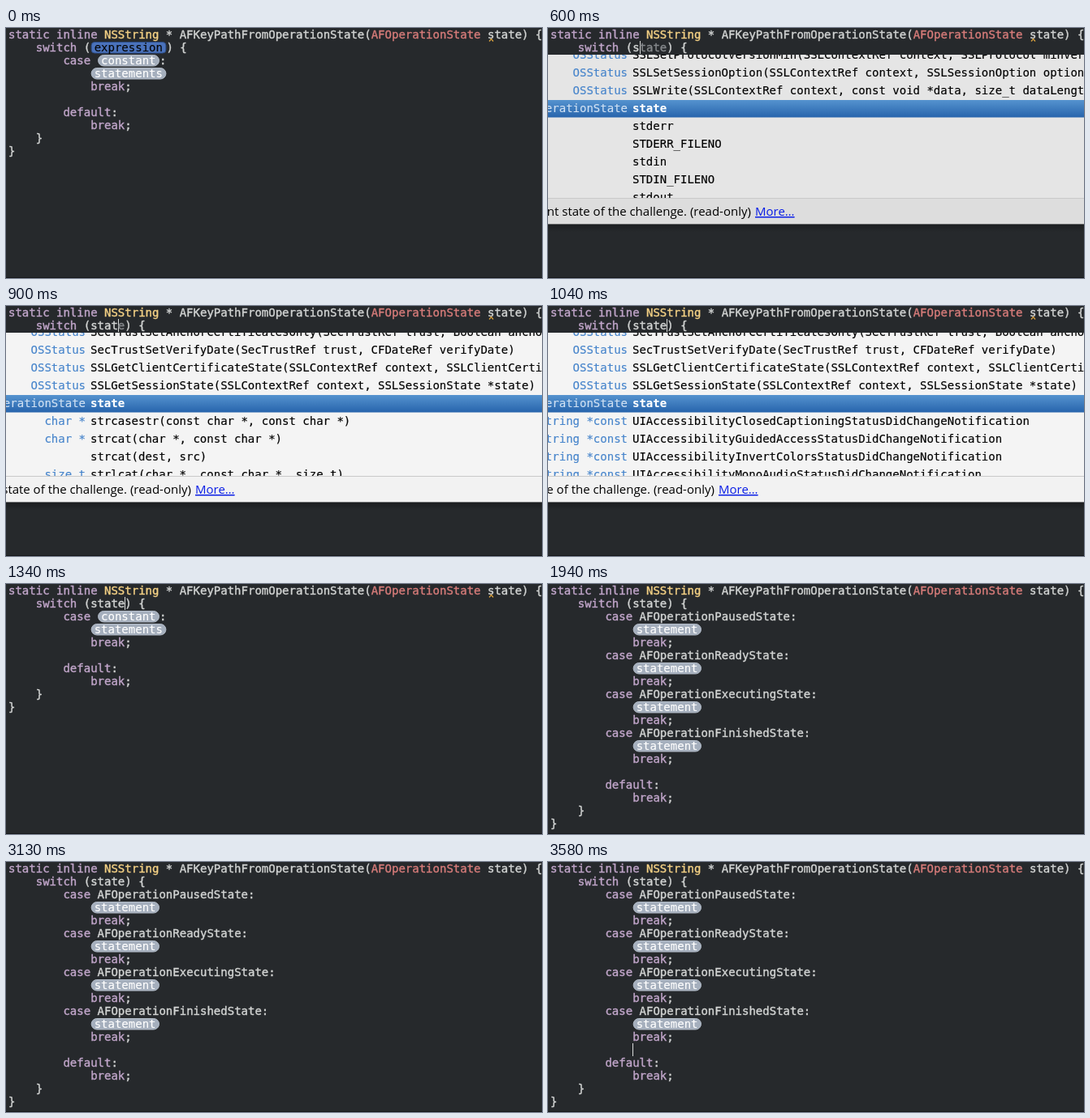
Write an HTML page that moves like this. It is 660 px wide and 309 px high and loops after 4130 ms.

```html
<!DOCTYPE html>
<html lang="en">
<head>
<meta charset="utf-8">
<title>Code completion</title>
<style>
  html, body { margin: 0; width: 100%; height: 100%; overflow: hidden; background: #26292c; }
  svg { display: block; width: 660px; height: 309px; }
  text {
    white-space: pre; font: 14px "DejaVu Sans Mono", monospace;
    color: #d2d4d3; fill: currentColor; stroke: currentColor; stroke-width: .4;
  }
  .key { color: #c0a5c9; }
  .type { color: #f3d084; }
  .arg { color: #d57b79; }
  .ghost { color: #85888b; }
  .token { color: #fff; stroke-width: .15; }
  .picked { color: #050607; stroke-width: .15; }
  .name { color: #000; stroke-width: .15; }
  .kind { color: #4684cb; stroke-width: .15; text-anchor: end; }
  .kind.on { color: #cfe0f3; }
  .name.on { color: #fff; font-weight: bold; }
  .note { color: #000; stroke-width: 0; font: 15px "Open Sans", "Noto Sans", sans-serif; }
  .end { text-anchor: end; }
  .link { color: #0a1ee6; text-decoration: underline; }
</style>
</head>
<body>
<svg id="stage" viewBox="0 0 660 309">
  <defs>
    <linearGradient id="bar" x2="0" y2="1">
      <stop stop-color="#5593cf"/><stop offset="1" stop-color="#2764ac"/>
    </linearGradient>
    <linearGradient id="shade" x2="0" y2="1">
      <stop stop-opacity=".3"/><stop offset="1" stop-opacity="0"/>
    </linearGradient>
    <clipPath id="rows"><rect y="33" width="660" height="177"/></clipPath>
  </defs>
</svg>
<script>
const LOOP = 4130, CHAR = 8.428, LEFT = 3, LINE = 16, ROW = 22;
const stage = document.getElementById('stage');

function add(parent, tag, attrs, text) {
  const el = document.createElementNS('http://www.w3.org/2000/svg', tag);
  for (const k in attrs) el.setAttribute(k, attrs[k]);
  if (text) el.textContent = text;
  return parent.appendChild(el);
}
const rect = (g, x, y, width, height, fill, more) =>
  add(g, 'rect', { x, y, width, height, fill, ...more });
const label = (g, x, y, cls, text) => add(g, 'text', { x, y, class: cls }, text);

const styles = [
  [/^(static|inline|switch|case|default|break)$/, 'key'],
  [/^NSString$/, 'type'],
  [/^AFOperationState$/, 'arg'],
  [/^~/, 'ghost']
];

// <word> is a placeholder, <!word> a selected one, ~word a suggested ending, | the caret.
function codeLine(g, row, source) {
  const top = row * LINE, base = top + 13;
  let x = LEFT;
  for (const part of source.match(/<[^>]+>|~?\w+|\||\s+|[^\w\s]/g)) {
    if (part === '|') {
      rect(g, Math.round(x), top, 1, LINE, '#d8dad9');
    } else if (part[0] === '<') {
      const picked = part[1] === '!';
      const word = part.replace(/[<>!]/g, '');
      const w = word.length * CHAR + 9;
      rect(g, x + 1, top + 1.5, w - 1.5, 13.5, picked ? '#4a72bb' : '#a5afbd',
        { rx: picked ? 4 : 6.75, stroke: picked ? '#2d4d86' : '#b4bdc9' });
      label(g, x + 4.5, base - 0.5, picked ? 'picked' : 'token', word);
      x += w;
    } else {
      const word = part.replace('~', '');
      const style = styles.find(s => s[0].test(part));
      if (word.trim()) label(g, x, base, style ? style[1] : '', word);
      x += word.length * CHAR;
    }
  }
}

const head = 'static inline NSString * AFKeyPathFromOperationState(AFOperationState state) {';
const tail = ['        default:', '            break;', '    }', '}'];
const stub = ['        case <constant>:', '            <statements>', '            break;', '', ...tail];
const cases = ['Paused', 'Ready', 'Executing', 'Finished'].flatMap(s =>
  [`        case AFOperation${s}State:`, '            <statement>', '            break;']);

function scene(subject, lines, warned = true) {
  const g = add(stage, 'g', { visibility: 'hidden' });
  [head, `    switch (${subject}) {`, ...lines].forEach((s, i) => s && codeLine(g, i, s));
  if (warned) {
    add(g, 'path', { d: 'M595 16.5l2.5-3 2.5 3', fill: 'none', stroke: '#d9a03c', 'stroke-width': 1.2 });
  }
  rect(g, 0, 308, 660, 1, '#15171a');
  return g;
}

// Each item is "return type|signature".
const chosen = 'AFOperationState|state';

function popup(typed, items, firstBase, noteEnd, paper, foot) {
  const g = scene(typed, []);
  rect(g, 0, 242, 660, 10, 'url(#shade)');
  rect(g, 0, 33, 660, 177, paper);
  rect(g, 0, 210, 660, 32.4, foot);
  const list = add(g, 'g', { 'clip-path': 'url(#rows)' });
  items.forEach((item, i) => {
    const [kind, name] = item.split('|');
    const y = firstBase + i * ROW;
    const on = item === chosen ? ' on' : '';
    if (on) rect(list, 0, y - 15, 660, 21.5, 'url(#bar)');
    label(list, 98, y, 'kind' + on, kind);
    label(list, 104, y, 'name' + on, name);
  });
  rect(g, 0, 210, 660, 1, '#c9c9c9');
  label(g, noteEnd, 232, 'note end', 'The current state of the challenge. (read-only)');
  label(g, noteEnd + 5, 232, 'note link', 'More…');
  return g;
}

const ssl = [
  'OSStatus|SSLGetClientCertificateState(SSLContextRef context, SSLClientCertificateState *clientState)',
  'OSStatus|SSLGetSessionState(SSLContextRef context, SSLSessionState *state)'
];
const trust = [
  'OSStatus|SecTrustSetAnchorCertificatesOnly(SecTrustRef trust, Boolean anchorCertificatesOnly)',
  'OSStatus|SecTrustSetVerifyDate(SecTrustRef trust, CFDateRef verifyDate)'
];
const strings = [
  'char *|strcasestr(const char *, const char *)',
  'char *|strcat(char *, const char *)',
  '|strcat(dest, src)'
];
const notices = ['ClosedCaptioning', 'GuidedAccess', 'InvertColors', 'MonoAudio'].map(s =>
  `NSString *const|UIAccessibility${s}StatusDidChangeNotification`);

const light = ['#f4f4f4', '#f2f2f2'];
const done = scene('state', [...cases, '', ...tail], false);
const doneCaret = scene('state', [...cases, '            |', ...tail], false);

const steps = [
  [0, scene('<!expression>', stub)],
  [600, popup('s|~tate', [
    'OSStatus|SSLSetProtocolVersionMin(SSLContextRef context, SSLProtocol minVersion)',
    'OSStatus|SSLSetSessionOption(SSLContextRef context, SSLSessionOption option, Boolean value)',
    'OSStatus|SSLWrite(SSLContextRef context, const void *data, size_t dataLength, size_t *processed)',
    chosen, '|stderr', '|STDERR_FILENO', '|stdin', '|STDIN_FILENO', '|stdout'
  ], 38, 250, '#e5e5e5', '#dddddd')],
  [750, popup('sta|~te', [
    '|SO_TIMESTAMP_MONOTONIC', '|SOCK_STREAM', ...ssl, chosen,
    'int|strcasecmp(const char *, const char *)', ...strings
  ], 37, 250, ...light)],
  [900, popup('stat|~e', [
    ...trust, ...ssl, chosen, ...strings, 'size_t|strlcat(char *, const char *, size_t)'
  ], 37, 228, ...light)],
  [1040, popup('state|', [...trust, ...ssl, chosen, ...notices], 37, 205, ...light)],
  [1340, scene('state|', stub)],
  [1490, doneCaret], [1940, done], [2540, doneCaret], [3130, done], [3580, doneCaret]
];

let shown;
function draw() {
  const t = performance.now() % LOOP;
  const next = steps.findLast(s => s[0] <= t)[1];
  if (next !== shown) {
    shown?.setAttribute('visibility', 'hidden');
    next.setAttribute('visibility', 'visible');
    shown = next;
  }
  requestAnimationFrame(draw);
}
draw();
</script>
</body>
</html>
```
